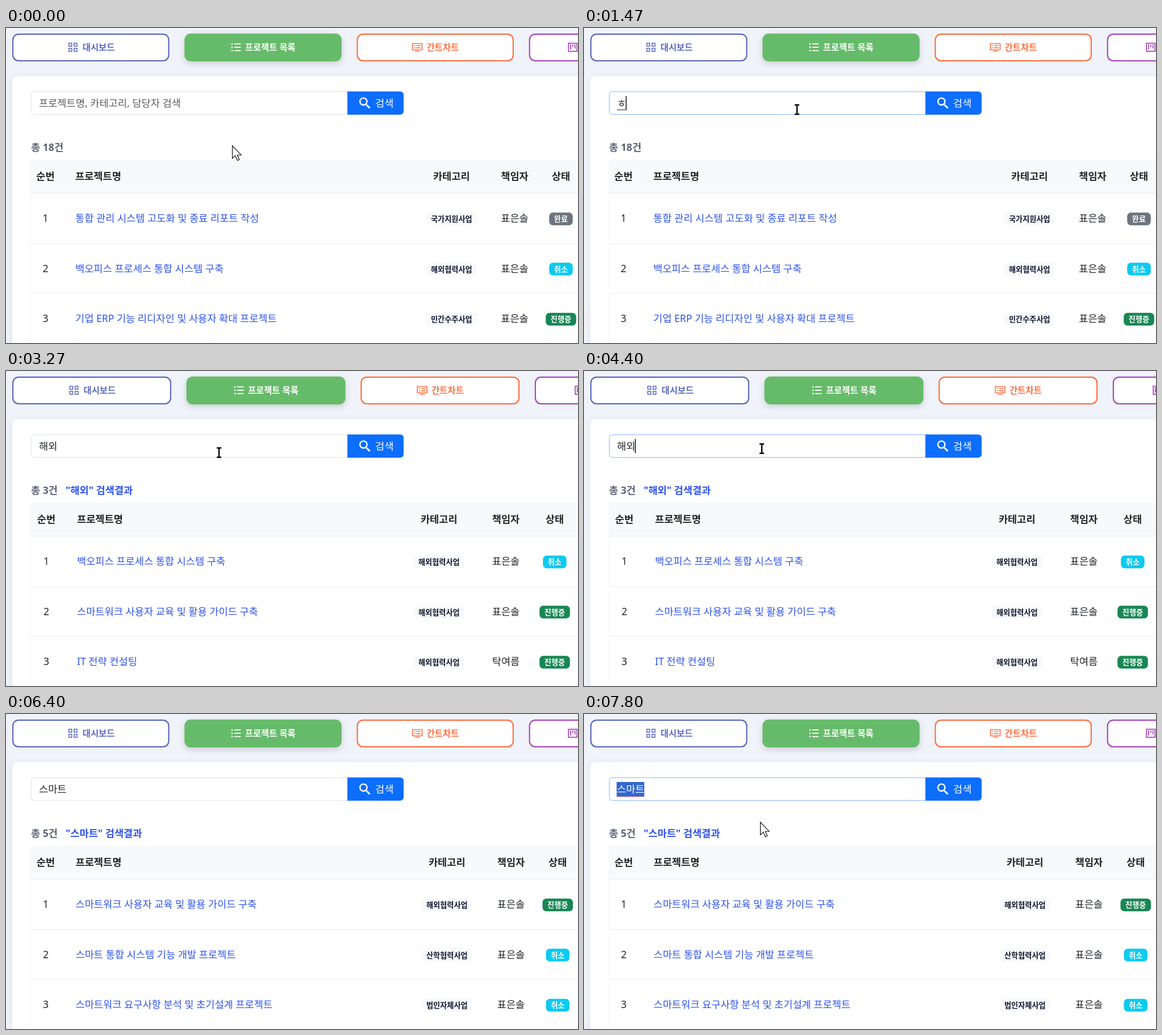
Recreate the animation shown at these times as an HTML page. Size 1007 by 556 pixels, loop 8000 ms.

```html
<!DOCTYPE html>
<html lang="ko">
<head>
<meta charset="utf-8">
<style>
html, body { margin: 0; width: 100%; height: 100%; overflow: hidden; background: #f0f3f9; }
svg { display: block; font: 17.6px "Noto Sans", "Noto Sans CJK KR", "Noto Sans CJK", sans-serif; }
.soft { filter: drop-shadow(0 2px 5px rgba(30, 50, 90, .1)); }
.lift { filter: drop-shadow(0 4px 6px rgba(0, 0, 0, .15)); }
</style>
</head>
<body>
<svg id="stage" width="1007" height="556" viewBox="0 0 1007 556"></svg>
<script>
const LOOP = 8000, EM = 17.6, GLYPH = EM * 0.92, TEXT_X = 58;
const LINK = '#2f54eb', INK = '#212529';
const STATUS = { 완료: '#6c757d', 취소: '#0dcaf0', 진행중: '#198754' };
const LEAD = '표은솔', OTHER = '탁여름';

// cols: centres of number, category, person, status; left edge of title
const views = [
  { from: 0, pitch: 303.2, tabW: 276.6, total: 18, query: '',
    cols: { num: 69.5, title: 122, cat: 784.3, who: 895.5, state: 977 },
    rows: [
      ['통합 관리 시스템 고도화 및 종료 리포트 작성', '국가지원사업', LEAD, '완료'],
      ['백오피스 프로세스 통합 시스템 구축', '해외협력사업', LEAD, '취소'],
      ['기업 ERP 기능 리디자인 및 사용자 확대 프로젝트', '민간수주사업', LEAD, '진행중']] },
  { from: 3270, pitch: 306.6, tabW: 280, total: 3, query: '해외',
    cols: { num: 71, title: 125, cat: 762.3, who: 880, state: 966 },
    rows: [
      ['백오피스 프로세스 통합 시스템 구축', '해외협력사업', LEAD, '취소'],
      ['스마트워크 사용자 교육 및 활용 가이드 구축', '해외협력사업', LEAD, '진행중'],
      ['IT 전략 컨설팅', '해외협력사업', OTHER, '진행중']] },
  { from: 6400, pitch: 303.2, tabW: 276.6, total: 5, query: '스마트',
    cols: { num: 70, title: 122.5, cat: 776.3, who: 889, state: 971.3 },
    rows: [
      ['스마트워크 사용자 교육 및 활용 가이드 구축', '해외협력사업', LEAD, '진행중'],
      ['스마트 통합 시스템 기능 개발 프로젝트', '산학협력사업', LEAD, '취소'],
      ['스마트워크 요구사항 분석 및 초기설계 프로젝트', '법인자체사업', LEAD, '취소']] }
];

// time, field text, mode
const typing = [
  [0, ''], [1200, 'ㅎ', 'compose'], [1670, '해', 'compose'], [1870, '해ㅇ', 'compose'],
  [1930, '해오', 'compose'], [2070, '해외', 'compose'], [2670, '해외'], [4530, '해외', 'select'],
  [5070, 'ㅅ', 'compose'], [5200, '스', 'compose'], [5270, '스ㅁ', 'compose'], [5330, '스마', 'compose'],
  [5470, '스맡', 'compose'], [5530, '스마트', 'compose'], [5800, '스마트'], [7400, '스마트', 'select']
];
const focusSpans = [[600, 3270], [4250, 6400], [7270, LOOP]];

// pointer runs: each is a list of time, x, y; the pointer is hidden between runs
const pointerRuns = [
  [[0, 398, 207], [400, 375, 144], [3870, 375, 144], [4130, 345, 148], [4330, 313, 137], [4520, 313, 137]],
  [[6470, 313, 137], [7000, 291, 140], [7200, 288, 141], [7390, 288, 141]],
  [[7600, 37, 163], [7670, 130, 205], [7730, 235, 228], [7800, 310, 190], [LOOP, 310, 190]]
];

const rect = (x, y, w, h, fill, r = 0, extra = '') =>
  `<rect x="${x}" y="${y}" width="${w}" height="${h}" rx="${r}" fill="${fill}" ${extra}/>`;
const path = (d, stroke, width = 1, fill = 'none') =>
  `<path d="${d}" fill="${fill}" stroke="${stroke}" stroke-width="${width}"/>`;
// y is the vertical middle of the letters
const label = (x, y, text, { fill = INK, size = EM, bold = false, mid = false } = {}) =>
  `<text x="${x}" y="${y + size * 0.365}" fill="${fill}" font-size="${size}"` +
  `${bold ? ' font-weight="700"' : ''}${mid ? ' text-anchor="middle"' : ''}>${text}</text>`;
const badge = (cx, y, text, fill, color) => {
  const w = text.length * 13.2 * 0.92 + 17.2;
  return rect(cx - w / 2, y - 11.2, w, 22.4, fill, 6.6) +
    label(cx, y + .3, text, { fill: color, size: 13.2, bold: true, mid: true });
};
const at = (x, y, content) => `<g transform="translate(${x} ${y})">${content}</g>`;

const icons = {
  grid: c => path('M.8 .8h5.2v5.4H.8zM10 .8h5.2v5.4H10zM.8 9.8h5.2v5.4H.8zM10 9.8h5.2v5.4H10z', c, 1.5),
  list: c => path('M0 2.2h2.4M0 8h2.4M0 13.8h2.4', c, 2.4) + path('M5 2.2h11.5M5 8h11.5M5 13.8h11.5', c, 1.8),
  screen: c => path('M1 1.5h16.8v11H1zM4 5h2M7.5 5h7.5M4 8.8h2M7.5 8.8h7.5M5 15h9', c, 1.7),
  board: c => path('M.9 .9h15v14.2h-15zM4.5 3v9M8.4 3v4.5M12.3 3v7', c, 1.8)
};
// name, colour, icon, icon and text offset from the tab centre
const tabs = [
  ['대시보드', '#5c6bc0', 'grid', -39.5, -14.5],
  ['프로젝트 목록', '#66bb6a', 'list', -55.7, -31.7],
  ['간트차트', '#ff7043', 'screen', -41, -15],
  ['', '#ab47bc', 'board', -69.5, 0]
];

function drawTabs({ pitch, tabW }) {
  return tabs.map(([name, color, icon, iconDx, textDx], i) => {
    const x = 11 + i * pitch, cx = x + tabW / 2, active = i === 1;
    const front = active ? '#fff' : color;
    return rect(x + 1.1, 10.8, tabW - 2.2, 47, active ? color : '#fff', 10,
        `stroke="${color}" stroke-width="2.2" ${active ? 'class="lift"' : ''}`) +
      at(cx + iconDx, 26, icons[icon](front)) +
      label(cx + textDx, 34.3, name, { fill: front, size: 15.4, bold: true });
  }).join('');
}

function drawTable({ cols, rows, total, query }) {
  const head = { bold: true, mid: true };
  let out = label(44, 210.5, `총 ${total}건`, { fill: '#5b6375', bold: true });
  if (query) out += label(105, 210.5, `"${query}" 검색결과`, { fill: LINK, bold: true });
  out += rect(43.5, 232.5, 1000, 400, '#fff', 7, 'stroke="#f3f5f8"') +
    path('M43 291V239q0-7 7-7H1007V291z', 'none', 0, '#f8f9fa') +
    label(cols.num, 262, '순번', head) + label(cols.title, 262, '프로젝트명', { bold: true }) +
    label(cols.cat, 262, '카테고리', head) + label(cols.who, 262, '책임자', head) +
    label(cols.state, 262, '상태', head);
  rows.forEach(([title, cat, who, state], i) => {
    const y = 336 + i * 88.5;
    out += path(`M44 ${Math.round(y - 45) + .5}H1007`, '#e9ecef') +
      label(cols.num, y, i + 1, { mid: true }) +
      label(cols.title, y, title, { fill: LINK }) +
      badge(cols.cat, y + 1, cat, '#f8f9fa', '#111a30') +
      label(cols.who, y, who, { mid: true }) +
      badge(cols.state, y + 1, state, STATUS[state], '#fff');
  });
  return out;
}

function drawField(t) {
  const [, text, mode] = typing.findLast(step => step[0] <= t);
  const span = focusSpans.find(([a, b]) => t >= a && t < b);
  const glow = span ? Math.min(1, (t - span[0]) / 130) : 0;
  const mix = (a, b) => Math.round(a + (b - a) * glow);
  const border = `rgb(${mix(222, 134)},${mix(226, 183)},${mix(230, 254)})`;
  const end = TEXT_X + text.length * GLYPH;
  let out = path('M601.5 112.5H50.5q-6 0-6 6v28q0 6 6 6H601.5z', border, 1, '#fff') +
    path('M601 112h92.5q6.5 0 6.5 6.5v28q0 6.5-6.5 6.5H601z', 'none', 0, '#0d6efd') +
    path('M634.5 135.5l6 6', '#fff', 3) +
    '<circle cx="629.3" cy="129.8" r="6.2" fill="none" stroke="#fff" stroke-width="2.4"/>' +
    label(650, 133, '검색', { fill: '#fff' });
  if (mode === 'select') out += rect(TEXT_X - .5, 120, end - TEXT_X, 26, '#3367d1');
  out += text
    ? label(TEXT_X, 133, text, { fill: mode === 'select' ? '#fff' : INK })
    : label(TEXT_X, 133, '프로젝트명, 카테고리, 담당자 검색', { fill: '#595c5f' });
  if (mode === 'select') {
    out += path(`M${TEXT_X} 145` + 'q1 -2 2 0t2 0'.repeat(text.length * 4), '#d93a4a');
  }
  if (mode === 'compose') out += rect(end - GLYPH, 144, GLYPH - 1, 1, INK);
  if (span && mode !== 'select') out += rect(end - .7, 120, 1.4, 25, '#000');
  return out;
}

function drawPointer(t) {
  const run = pointerRuns.find(r => t >= r[0][0] && t <= r.at(-1)[0]);
  if (!run) return '';
  const i = run.findLastIndex(key => key[0] <= t);
  const a = run[i], b = run[i + 1] || a;
  const k = b === a ? 0 : (t - a[0]) / (b[0] - a[0]), ease = k * k * (3 - 2 * k);
  const x = a[1] + (b[1] - a[1]) * ease, y = a[2] + (b[2] - a[2]) * ease;
  if (y > 153) {
    return at(x, y, path('M.5 .8V23.2L5.6 18.4 9.4 26.8 12.8 25.3 9.2 17.2H16z', '#000', 1.1, '#fff'));
  }
  const beam = 'M-4-8.3h3l1 .8 1-.8h3M-4 8.3h3l1-.8 1 .8h3M0-8V8';
  return at(x, y, path(beam, '#fff', 4.2) + path(beam, '#000', 2.4));
}

function draw(t) {
  const view = views.findLast(v => v.from <= t);
  stage.innerHTML = drawTabs(view) + rect(11, 85, 1020, 500, '#fff', 8, 'class="soft"') +
    drawTable(view) + drawField(t) + drawPointer(t);
}

const stage = document.getElementById('stage');
let shown = -1;
function tick() {
  const step = Math.floor((performance.now() % LOOP + 4) * 0.015) % 120;
  if (step !== shown) draw(Math.round((shown = step) * 20 / 3) * 10);
  requestAnimationFrame(tick);
}
tick();
</script>
</body>
</html>
```
